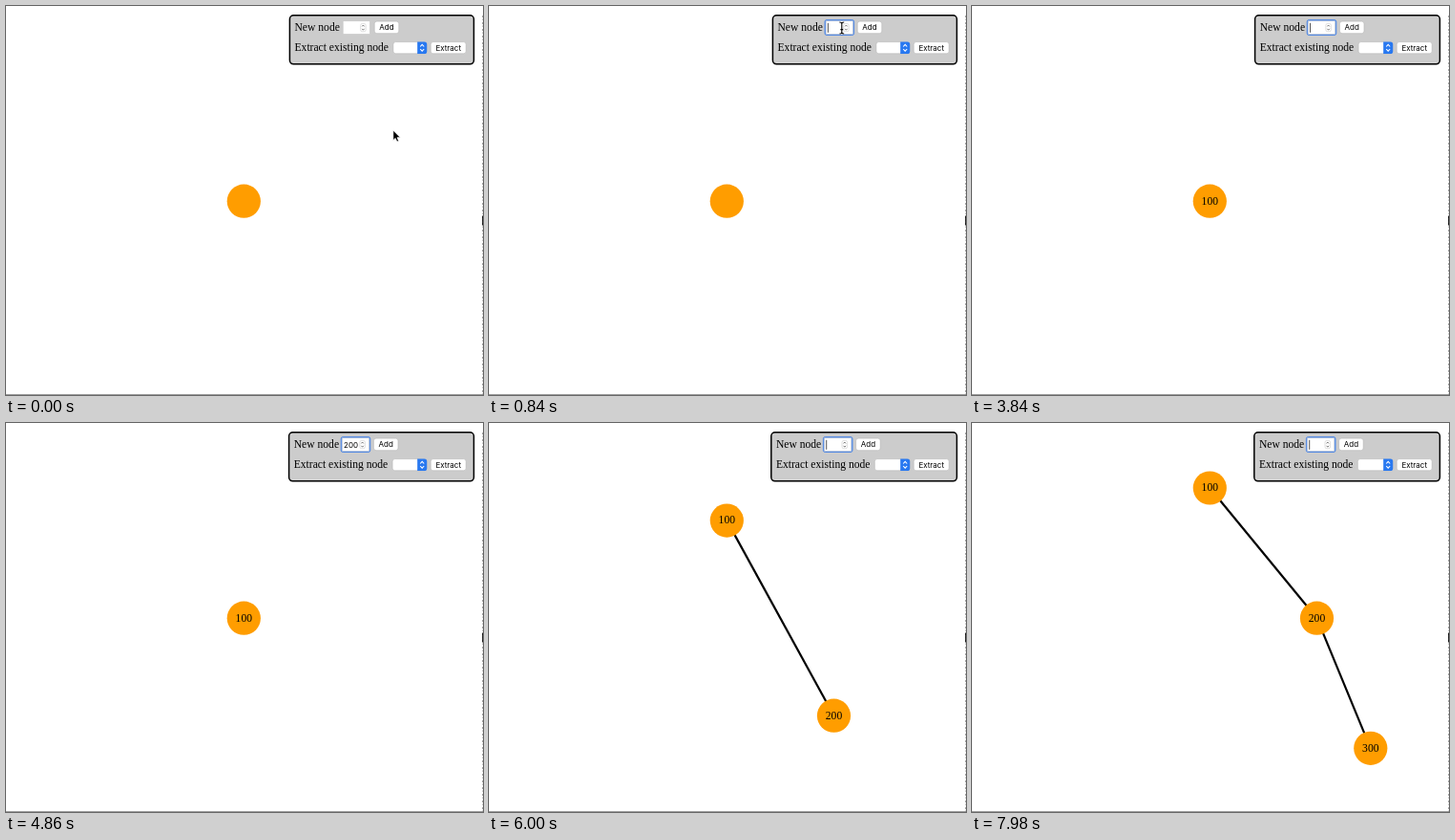
Animation of 500x407 px, one loop 8 s. Source, as an HTML page:

```html
<!DOCTYPE html>
<html lang="en">
<head>
<meta charset="utf-8">
<title>Tree builder</title>
<style>
html, body { margin: 0; width: 100%; height: 100%; overflow: hidden; background: #fff; }
svg { display: block; width: 500px; height: 407px; }
text { font: 11.6px "Liberation Serif", Times, serif; }
.ui { font: 8px Inter, "Liberation Sans", sans-serif; }
.node text, .mid { text-anchor: middle; }
.node circle { fill: #ff9d00; }
.edge { stroke: #000; stroke-width: 2.2; }
.btn { fill: #fff; stroke: #b4b4b4; stroke-width: .6; }
</style>
</head>
<body>
<svg viewBox="0 0 500 407">
  <path d="M0 406.5H500" stroke="#a0a0a0"/>
  <path d="M499.6 10V407" stroke="#888" stroke-width=".8" stroke-dasharray="2 1.6 1 2.4"/>
  <path d="M499.6 219.5V229.5" stroke="#000" stroke-width=".9"/>
  <g id="tree"></g>

  <rect id="panel" y="9.8" height="51" rx="4" fill="#ccc" stroke="#000" stroke-width="1.5"/>
  <g id="form">
    <text x="302.5" y="25.6">New node</text>
    <text x="302.5" y="46.8">Extract existing node</text>
    <rect id="ring" x="352" y="14.5" width="30.6" height="16" rx="2" fill="#6d9ff0" stroke="#4f86e2" stroke-width=".9"/>
    <rect x="353.2" y="15.8" width="28.2" height="13.6" fill="#fff" stroke="#c2c2c2" stroke-width=".5"/>
    <rect x="371.6" y="18.4" width="5.6" height="8.4" rx="2" fill="#fff" stroke="#ccc" stroke-width=".6"/>
    <path d="M373.2 21.4l1.2-1.4 1.2 1.4M373.2 23.8l1.2 1.4 1.2-1.4" fill="none" stroke="#555" stroke-width=".8"/>
    <text id="value" class="ui" x="354.9" y="25.7"></text>
    <rect id="caret" y="17.8" width=".9" height="10" fill="#444"/>
    <rect class="btn" x="386.2" y="16.1" width="25.6" height="12.6" rx="2.6"/>
    <text class="ui mid" x="399" y="25.2">Add</text>
  </g>
  <rect id="select" class="btn" y="37.6" height="12.2" rx="2.6"/>
  <path d="M431.2 37.4h7.4q2.6 0 2.6 2.6v7.4q0 2.6-2.6 2.6h-7.4z" fill="#2878f0"/>
  <path d="M434.2 42.5l2-2.2 2 2.2M434.2 45l2 2.2 2-2.2" fill="none" stroke="#fff" stroke-width="1.1"/>
  <rect class="btn" x="445.2" y="37.6" width="37" height="12.2" rx="2.6"/>
  <text class="ui mid" x="463.7" y="46.5">Extract</text>

  <path id="arrow" d="M0 0V10.6L2.4 8.4L4 12.1L5.9 11.3L4.3 7.7H7.6Z" fill="#000" stroke="#fff" stroke-width=".8"/>
  <g id="beam" fill="none">
    <path d="M-2.4-6Q0-6 0-4.4Q0-6 2.4-6M0-4.6V4.6M-2.4 6Q0 6 0 4.4Q0 6 2.4 6M-1.4 1.6H1.4" stroke="#fff" stroke-width="2.2"/>
    <path d="M-2.4-6Q0-6 0-4.4Q0-6 2.4-6M0-4.6V4.6M-2.4 6Q0 6 0 4.4Q0 6 2.4 6M-1.4 1.6H1.4" stroke="#000" stroke-width="1.1"/>
  </g>
</svg>
<script>
const LOOP = 8000, BLINK = 480, FOCUS = 840;
const $ = id => document.getElementById(id);
const set = (el, attrs) => { for (const k in attrs) el.setAttribute(k, attrs[k]); };
const show = (el, on) => set(el, { visibility: on ? "visible" : "hidden" });

// Each input event: time and the field's new value
const typing = [
  [FOCUS, ""], [1800, "1"], [2100, "10"], [2220, "100"],
  [2880, ""], [4080, "2"], [4260, "20"], [4380, "200"],
  [4980, ""], [6720, "3"], [6900, "30"], [7020, "300"],
  [7620, ""]
];

// Layouts of the tree: start time, panel growth, node [label, x, y]
const stages = [
  [0, 0, [["", 249.3, 204.2]]],
  [2880, .8, [["100", 249.3, 204.2]]],
  [4980, 1.6, [["100", 249.3, 102.1], ["200", 361.5, 306.2]]],
  [7620, 1.6, [["100", 249.3, 68], ["200", 361.5, 204.2], ["300", 417.8, 340.3]]]
];

const last = (list, t) => list.filter(e => e[0] <= t).pop();

function treeMarkup(nodes) {
  const edges = nodes.slice(1).map(([, x, y], i) =>
    `<line class="edge" x1="${nodes[i][1]}" y1="${nodes[i][2]}" x2="${x}" y2="${y}"/>`);
  const discs = nodes.map(([label, x, y]) =>
    `<g class="node"><circle cx="${x}" cy="${y}" r="17.6"/><text x="${x}" y="${y + 3.3}">${label}</text></g>`);
  return edges.concat(discs).join("");
}

let stage;
function drawStage(next) {
  if (next === stage) return;
  stage = next;
  const grow = stage[1];
  $("tree").innerHTML = treeMarkup(stage[2]);
  set($("panel"), { x: 297.4 - grow, width: 193 + grow });
  set($("form"), { transform: `translate(${-grow})` });
  set($("select"), { x: 405.9 - grow, width: 35.2 + grow });
}

function drawField(t) {
  const [since, value] = last(typing, t) || [0, ""];
  const focused = t >= FOCUS;
  // The blink restarts on input, but runs on with a half-second rhythm
  const lit = focused && Math.floor((t - since) / BLINK) % 2 === 0;
  const field = $("value");
  if (field.textContent !== value) field.textContent = value;
  show($("ring"), focused);
  show($("caret"), lit);
  set($("caret"), { x: 354.9 + (value ? field.getComputedTextLength() : 0) });
}

function drawPointer(t) {
  const p = Math.min(1, Math.max(0, (t - 30) / 690));
  const e = p * p * (3 - 2 * p);
  const x = 405.8 - 36 * e, y = 130 - 107 * e;
  const over = y < 30, visible = t < 1800;
  show($("arrow"), visible && !over);
  show($("beam"), visible && over);
  for (const id of ["arrow", "beam"]) set($(id), { transform: `translate(${x} ${y})` });
}

const start = performance.now();
function frame(now) {
  const t = Math.max(0, now - start) % LOOP;
  drawStage(last(stages, t));
  drawField(t);
  drawPointer(t);
  requestAnimationFrame(frame);
}
frame(start);
</script>
</body>
</html>
```
